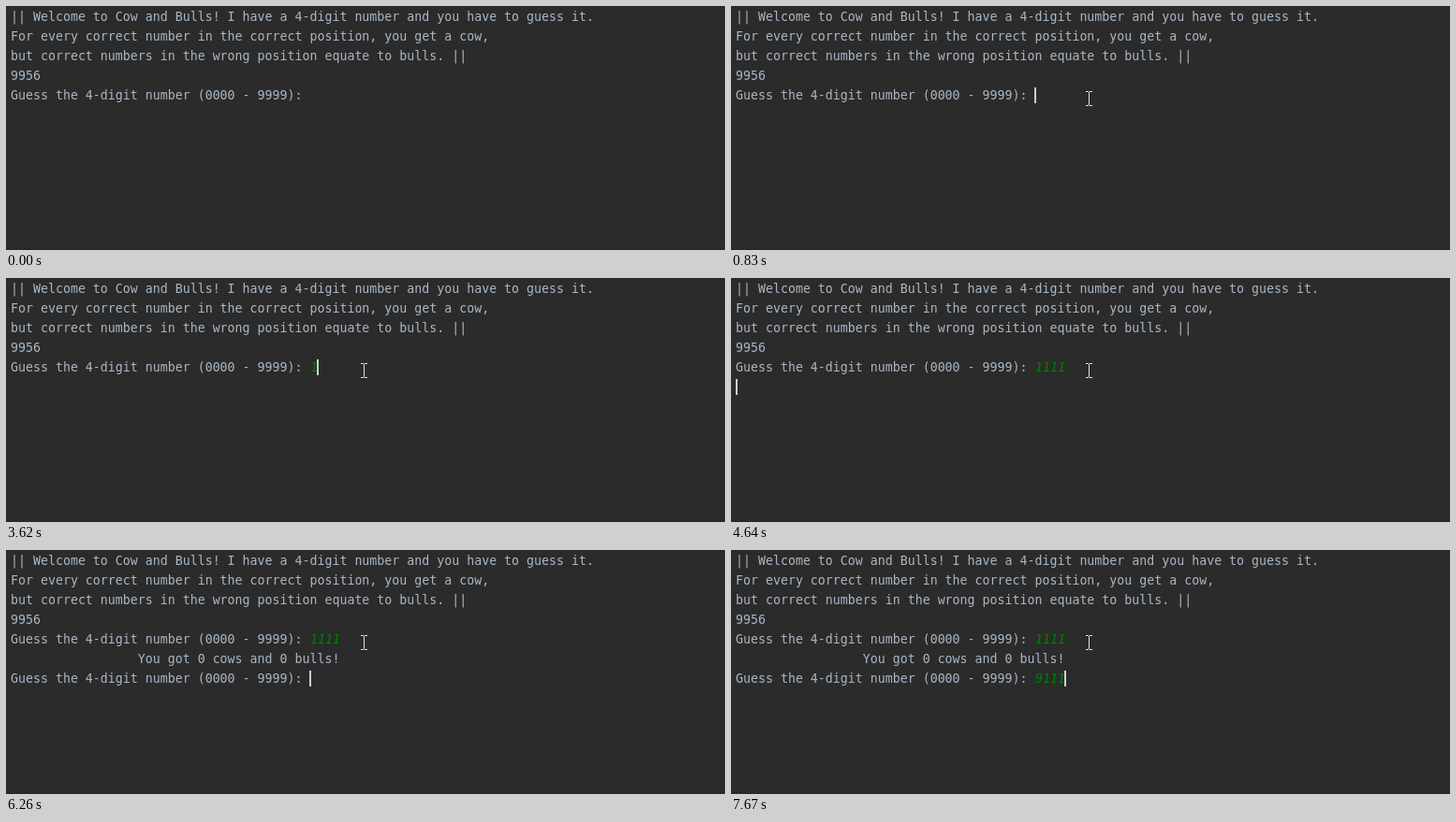
These frames come from a looping animation (768 by 261 pixels, 8000 ms). An HTML page with a canvas:

```html
<!DOCTYPE html>
<html lang="en">
<head>
<meta charset="utf-8">
<title>Cow and Bulls</title>
<style>
  html, body { margin: 0; width: 100%; height: 100%; overflow: hidden; background: #2b2b2b; }
  canvas { display: block; }
</style>
</head>
<body>
<canvas id="stage" width="768" height="261"></canvas>
<script>
const ctx = document.getElementById('stage').getContext('2d', { alpha: false });
const LOOP = 8000, LEFT = 5, CHAR = 8, LINE = 21;
const FONT = '13.288px "DejaVu Sans Mono", "Noto Sans Mono", monospace';
const PROMPT = 'Guess the 4-digit number (0000 - 9999): ';
const INTRO = [
  '|| Welcome to Cow and Bulls! I have a 4-digit number and you have to guess it.',
  'For every correct number in the correct position, you get a cow,',
  'but correct numbers in the wrong position equate to bulls. ||',
  '9956',
  PROMPT
];
const RESULT = ' '.repeat(17) + 'You got 0 cows and 0 bulls!';

const FIRST_KEYS = [3620, 3790, 4030, 4330];
const SECOND_KEYS = [7200, 7350, 7500, 7670];
const ENTER = 4640, REPLY = 4870;
const CARET_TOGGLES = [830, 1290, 1770, 2230, 2760, 3240, 3620, 5730, 6260, 6740, 7200];

// Pointer stops: time, x, y
const POINTER = [
  [130, 561, 224], [210, 520, 185], [290, 470, 145], [370, 425, 115], [450, 397, 100],
  [530, 385, 94], [600, 382, 97], [680, 382, 100], [770, 382, 99]
];

const passed = (times, t) => times.filter(time => t >= time).length;

function write(text, row, col = 0, typed = false) {
  ctx.font = (typed ? 'italic ' : '') + FONT;
  ctx.fillStyle = typed ? '#007f00' : '#a9b7c6';
  ctx.fillText(text, LEFT + col * CHAR, 16 + row * LINE);
}

function drawCaret(row, col) {
  ctx.fillStyle = '#cecece';
  ctx.fillRect(LEFT + col * CHAR - (col ? 1 : 0), 3 + row * LINE, 2, 17);
}

function drawPointer(x, y) {
  ctx.fillStyle = '#e4e4e4';
  ctx.fillRect(x, y - 7, 1, 14);
  for (const edge of [y - 8, y + 7]) {
    ctx.fillRect(x - 3, edge, 3, 1);
    ctx.fillRect(x + 1, edge, 3, 1);
  }
}

function draw(t) {
  ctx.fillStyle = '#2b2b2b';
  ctx.fillRect(0, 0, 768, 261);
  ctx.fillStyle = '#282828';
  ctx.fillRect(0, 258, 768, 3);

  INTRO.forEach((text, row) => write(text, row));
  const first = passed(FIRST_KEYS, t), second = passed(SECOND_KEYS, t);
  write('1111'.slice(0, first), 4, PROMPT.length, true);
  if (t >= REPLY) {
    write(RESULT, 5);
    write(PROMPT, 6);
    write('9111'.slice(0, second), 6, PROMPT.length, true);
  }

  if (passed(CARET_TOGGLES, t) % 2) {
    if (t >= REPLY) drawCaret(6, PROMPT.length + second);
    else if (t >= ENTER) drawCaret(5, 0);
    else drawCaret(4, PROMPT.length + first);
  }

  const stop = POINTER.filter(([time]) => t >= time).pop();
  if (stop) drawPointer(stop[1], stop[2]);
}

const start = performance.now();
function tick() {
  draw((performance.now() - start) % LOOP);
  requestAnimationFrame(tick);
}
tick();
</script>
</body>
</html>
```
